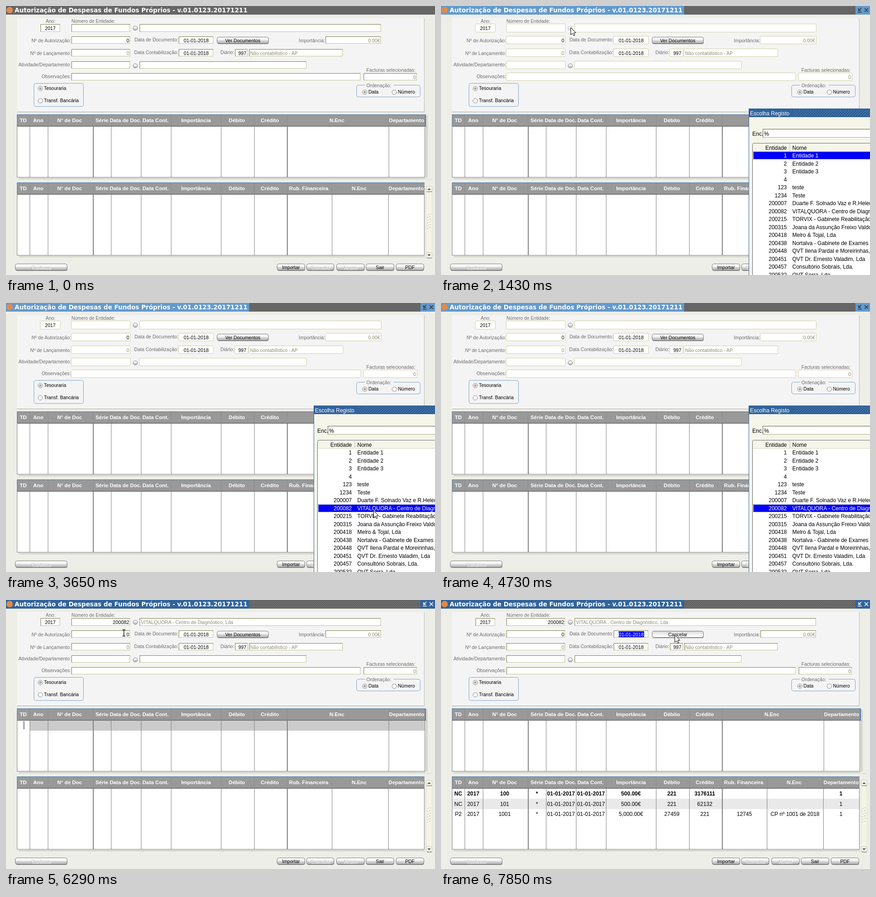
Write an HTML page that moves like this. It is 944 px wide and 593 px high and loops after 8000 ms.

```html
<!DOCTYPE html>
<html lang="pt">
<head>
<meta charset="utf-8">
<style>
html, body { margin: 0; width: 100%; height: 100%; overflow: hidden; background: #eeeee8; }
svg { display: block; width: 944px; height: 593px; font: 10.5px "Liberation Sans", Arial, sans-serif; }
rect, line { shape-rendering: crispEdges; }
.round { shape-rendering: auto; }
text { white-space: pre; }
</style>
</head>
<body>
<svg id="stage" viewBox="0 0 944 593"></svg>
<script>
const LOOP = 8000;
const LABEL = '#6c6c6c', OLIVE = '#8c8c70', GRAY = '#808080', BLUE = '#31639c';

const rect = (x, y, w, h, fill, extra = '') =>
  `<rect x="${x}" y="${y}" width="${w}" height="${h}" fill="${fill}" ${extra}/>`;
const box = (x, y, w, h, fill, stroke, r = 0) =>
  rect(x + .5, y + .5, w - 1, h - 1, fill, `stroke="${stroke}" rx="${r}"${r ? ' class="round"' : ''}`);
const line = (x1, y1, x2, y2, color, width = 1) =>
  `<line x1="${x1}" y1="${y1}" x2="${x2}" y2="${y2}" stroke="${color}" stroke-width="${width}"/>`;
const vline = (x, y1, y2, color, w = 1) => rect(x, y1, w, y2 - y1, color);
const text = (x, y, s, fill = LABEL, anchor = 'start', extra = '') =>
  `<text x="${x}" y="${y}" fill="${fill}" text-anchor="${anchor}" ${extra}>${s.replace(/&/g, '&amp;')}</text>`;
const group = (id, body, extra = '') => `<g id="${id}" ${extra}>${body}</g>`;

const defs = `<defs>
  <linearGradient id="metal" x2="0" y2="1"><stop stop-color="#fff"/><stop offset=".45" stop-color="#f4f4f4"/>
    <stop offset=".55" stop-color="#d6d6d6"/><stop offset="1" stop-color="#b4b4b4"/></linearGradient>
  <linearGradient id="glow" x2="0" y2="1"><stop stop-color="#d2d2d2"/><stop offset=".5" stop-color="#f2f2f2"/>
    <stop offset="1" stop-color="#fff"/></linearGradient>
  <pattern id="grip" width="4" height="4" patternUnits="userSpaceOnUse">
    ${rect(0, 0, 1, 1, '#a8a8a8') + rect(2, 2, 1, 1, '#a8a8a8') + rect(1, 1, 1, 1, '#303030') + rect(3, 3, 1, 1, '#303030')}</pattern>
  <pattern id="blueGrip" width="6" height="6" patternUnits="userSpaceOnUse">
    ${rect(0, 0, 1, 1, '#a5c6e7') + rect(3, 3, 1, 1, '#a5c6e7') + rect(1, 1, 1, 1, '#102c4c') + rect(4, 4, 1, 1, '#102c4c')}</pattern>
</defs>`;

// x, y, width, height
const fields = [
  [76, 40, 43, 17], [144, 40, 129, 17], [294, 40, 531, 17],
  [144, 67, 129, 16], [380, 67, 76, 16], [703, 67, 122, 16],
  [144, 95, 129, 16], [380, 95, 76, 16], [504, 95, 28, 16], [535, 95, 206, 16],
  [144, 122, 129, 16], [294, 122, 367, 16],
  [144, 148, 636, 16], [787, 148, 117, 16]
];

const sunkenField = ([x, y, w, h]) => box(x, y, w, h, '#fff', '#c2c294') +
  rect(x, y, w, 1, '#7b7b4a') + rect(x, y, 1, h, '#7b7b4a');
const flatField = ([x, y, w, h]) => box(x - 1, y - 1, w + 2, h + 2, '#fff', '#d0d0a4', 1);

const fieldValues =
  text(97.5, 53, '2017', '#000', 'middle') + text(271, 80, '0', '#000', 'end') +
  text(823, 80, '0.00€', OLIVE, 'end') + text(271, 108, '0', OLIVE, 'end') +
  text(418.5, 108, '01-01-2018', '#000', 'middle', 'font-size="10.8"') +
  text(520, 108, '997', '#000', 'middle') + text(537, 108, 'Não contabilistico - AP', OLIVE) +
  text(902, 161, '0', OLIVE, 'end');

const labels = text(98, 37, 'Ano:', LABEL, 'middle') + text(144, 37, 'Número de Entidade:', LABEL, 'start', 'font-size="10.2"') +
  [['Nº de Autorização:', 143, 80], ['Nº de Lançamento:', 143, 108], ['Atividade/Departamento:', 143, 133],
   ['Observações:', 143, 159], ['Data de Documento:', 379, 78], ['Data Contabilização:', 379, 106],
   ['Importância:', 702, 80], ['Diário:', 502, 106], ['Facturas selecionadas:', 901, 145]]
    .map(([s, x, y]) => text(x, y, s, LABEL, 'end')).join('');

const knob = (y, id = '') => `<circle ${id} cx="284.5" cy="${y}" r="4.7" fill="url(#metal)" stroke="#7c7c7c"/>`;

const radio = (x, y, label, on) =>
  `<circle cx="${x}" cy="${y}" r="5" fill="#f8f8f8" stroke="#888"/>` +
  (on ? `<circle cx="${x}" cy="${y}" r="2.7" fill="#a8a8a8"/>` : '') + text(x + 8, y + 3, label, '#000');

const radios = box(61, 170, 110, 52, 'none', '#7ba2ce', 4) + radio(75.5, 182, 'Tesouraria', true) +
  radio(75.5, 209, 'Transf. Bancária') + box(771, 174, 141, 27, 'none', '#7ba2ce', 4) +
  rect(790, 172, 63, 5, '#f4f4f4') + text(793, 179, 'Ordenação:') +
  radio(789.5, 190, 'Data', true) + radio(854.5, 190, 'Número');

const buttonShape = (x, y, w, fill = 'url(#metal)') =>
  rect(x + 1, y + 2, w - 1, 14, '#8a8a8a', 'rx="4" class="round"') + box(x, y, w, 15, fill, '#787878', 4);
const button = (x, w, s, on = true) => buttonShape(x, 568, w) +
  (on ? '' : text(x + w / 2 + 1, 582, s, '#fff', 'middle')) +
  text(x + w / 2 - (on ? 0 : .5), on ? 580 : 581, s, on ? '#000' : '#c0c0c0', 'middle');

const buttons = button(20, 115, 'Confirme', false) + button(596, 62, 'Importar') +
  button(661, 61, 'Consulta', false) + button(727, 62, 'Abater', false) +
  button(792, 62, 'Sair') + button(858, 62, 'PDF');

const heads = ['TD', 'Ano', 'N° de Doc', 'Série', 'Data de Doc.', 'Data Cont.', 'Importância', 'Débito', 'Crédito'];
const centers = [38, 71, 140, 211, 263, 329, 418, 508, 580.5];
const columns = [52, 92, 191, 231, 297, 363, 473, 546, 618];

function table(top, bottom, right, extraHeads, extraColumns) {
  const lines = [...columns, ...extraColumns];
  const head = (s, x) => text(x, top + 17, s, '#fff', 'middle', 'font-weight="bold" font-size="11.5"');
  return rect(28, bottom + 1, right - 27, 3, '#d4d4cc') +
    box(24, top + 26, right - 24, bottom - top - 26, '#fff', GRAY) +
    rect(24, top, right - 24, 27, '#999') + rect(24, top, right - 24, 1, '#4a79ad') + rect(24, top, 1, 26, '#4a79ad') +
    rect(24, top + 25, right - 24, 2, '#787878') +
    lines.map(x => vline(x, top + 1, top + 25, '#8e8e8e') +
      vline(x, top + 27, bottom, GRAY, x === 191 || x === 618 ? 2 : 1)).join('') +
    heads.map((s, i) => head(s, centers[i])).join('') + extraHeads.map(([s, x]) => head(s, x)).join('');
}

const arrowButton = (y, d) => box(924, y, 14, 13, '#f6f6ee', '#c8c8b0', 3) +
  `<path d="M927 ${y + 6.5 + 2 * d}h8l-4 ${-4 * d}z" fill="#555"/>` + rect(926, y + 12, 11, 1, '#555');
const scrollbars = rect(923, 241, 5, 137, '#d6d6ce') + rect(922, 239, 2, 27, '#4a79ad') + rect(924, 266, 4, 1, '#b8b8b0') +
  '<path d="M926 381q5 4 11 0" fill="none" stroke="#d0d0b8"/>' +
  box(924, 397, 14, 160, '#f4f4e6', '#e0e0c8', 5) + arrowButton(397, 1) + arrowButton(543, -1) +
  Array.from({ length: 12 }, (_, i) => rect(928 + i % 2 * 5 - (i >> 1) % 2, 459 + (i >> 1) * 6 - i % 2 * 2, 1, 2, '#a8a898')).join('');

const emptyRow = rect(53, 266, 868, 22, '#cbcbcb') +
  [...columns, 842].map(x => vline(x, 266, 288, GRAY, x === 191 || x === 618 ? 2 : 1)).join('');

const rowCenters = [...centers, 667.5, 779, 880];
const results = rect(25, 438, 895, 23, '#e9e9e9') +
  [...columns, 717, 841].map(x => vline(x, 438, 461, GRAY, x === 191 || x === 618 ? 2 : 1)).join('') +
  ['NC 100 500.00€ 221 3176111', 'NC 101 500.00€ 221 62132', 'P2 1001 5,000.00€ 27459 221'].map((row, r) => {
    const [kind, doc, amount, debit, credit] = row.split(' ');
    const day = '01-01-2017';
    const cells = [kind, '2017', doc, '*', day, day, amount, debit, credit,
      r === 2 ? '12745' : '', r === 2 ? 'CP nº 1001 de 2018' : '', '1'];
    return cells.map((s, i) => text(i === 4 ? 264 : i === 5 ? 330 : rowCenters[i], 431 + Math.round(r * 22.5), s, '#000', 'middle',
      `font-size="12" ${r ? '' : 'font-weight="bold"'}`)).join('');
  }).join('');

const title = rect(0, 0, 944, 19, '#666', 'id="barRest"') + rect(0, 0, 535, 19, '#666', 'id="barText"') +
  rect(912, 0, 32, 19, '#666', 'id="barIcons"') + group('barGrip', rect(537, 4, 375, 11, 'url(#grip)')) +
  '<circle cx="8" cy="9" r="7" fill="#e08a4a"/>' +
  text(19, 14, 'Autorização de Despesas de Fundos Próprios - v.01.0123.20171211', '#fff', 'start',
    'font-weight="bold" style="font-size:13.5px;font-family:\'DejaVu Sans\',Verdana,sans-serif"') +
  group('icons', '<path d="M925 4l-6 6m0-5v5h5M917 13.500h9M932 5l8 8m0-8l-8 8" fill="none" stroke-width="1.600"/>');

const entities = [
  ['1', 'Entidade 1'], ['2', 'Entidade 2'], ['3', 'Entidade 3'], ['4', ''], ['123', 'teste'], ['1234', 'Teste'],
  ['200007', 'Duarte F. Solnado Vaz e R.Helena'], ['200082', 'VITALQUORA - Centro de Diagnóstico, Lda'],
  ['200215', 'TORVIX - Gabinete Reabilitação Sul'], ['200315', 'Joana da Assunção Freixo Valdo'],
  ['200418', 'Melro & Tojal, Lda'], ['200438', 'Nortalva - Gabinete de Exames Gerais'],
  ['200448', 'QVT Ilena Pardal e Moreirinhas, Lda'], ['200451', 'QVT Dr. Ernesto Valadim, Lda'],
  ['200457', 'Consultório Sobrais, Lda.'], ['200532', 'QVT Serra, Lda']
];
const entityRow = ([code, name], i, color) => {
  const y = 334 + i * 17.5;
  return text(761, y, code, color, 'end') + text(773, y, name, color);
};
const picked = (id, i) => {
  const y = Math.round(321 + i * 17.5);
  return group(id, rect(687, y, 257, 17, '#0000ff') +
    rect(687.5, y + .5, 270, 16, 'none', 'stroke="#d8d860" stroke-dasharray="1 1"') + entityRow(entities[i], i, '#fff'));
};
const popup = rect(677, 226, 267, 367, '#f5f5ea') + rect(677, 226, 1, 367, BLUE) + rect(677, 226, 267, 19, BLUE) +
  rect(777, 231, 167, 11, 'url(#blueGrip)') + text(680, 241, 'Escolha Registo', '#fff') +
  text(685, 286, 'Enc.', '#000') + box(708, 271, 260, 19, '#fff', '#a8a878') +
  rect(708, 271, 236, 1, '#5c5c40') + rect(708, 271, 1, 19, '#5c5c40') + text(711, 286, '%', '#000') +
  box(685, 302, 280, 310, '#fff', '#606060', 3) + rect(687, 304, 257, 16, '#f5f5ea') + rect(687, 320, 257, 1, '#d4d4c0') +
  vline(767, 304, 320, '#c0c0b0') + text(761, 317, 'Entidade', '#000', 'end') + text(773, 317, 'Nome', '#000') +
  entities.map((e, i) => entityRow(e, i, '#000')).join('') + picked('pickFirst', 0) + picked('pickEighth', 7);

const stage = document.getElementById('stage');
stage.innerHTML = defs + rect(0, 0, 944, 593, '#eeeee8') +
  rect(24, 27, 897, 207, '#f4f4f4') + rect(920, 27, 1, 207, '#b4b4b4') + rect(24, 233, 897, 1, '#a8a8a8') + title + labels +
  group('sunken', fields.map(sunkenField).join('')) + group('flat', fields.map(flatField).join('')) +
  fieldValues + group('dateMark', rect(391, 69, 56, 13, '#0000ff')) +
  text(418.5, 80, '01-01-2018', '#000', 'middle', 'id="date" font-size="10.8"') +
  group('entity', text(271, 53, '200082', '#000', 'end', 'font-size="10.8"') + text(297, 53, entities[7][1], OLIVE)) +
  knob(49, 'id="lookup"') + knob(132) + radios +
  group('raised', buttonShape(464, 68, 114)) + group('hovered', buttonShape(464, 68, 114, 'url(#glow)')) +
  text(521, 80, 'Ver Documentos', '#000', 'middle', 'id="action"') +
  table(239, 378, 922, [['N.Enc', 728], ['Departamento', 881.5]], [842]) + group('emptyRow', emptyRow) +
  rect(39, 267, 1, 18, '#000', 'id="caret"') +
  table(389, 550, 921, [['Rub. Financeira', 666], ['N.Enc', 777], ['Departamento', 880.5]], [717, 841]) +
  group('results', results) + scrollbars + buttons + group('popup', popup, 'font-size="12"') +
  group('pointer', group('arrow', '<path d="M0 0v16l4-3.500 2.500 5.500 2.500-1-2.500-5.500h5z" fill="#fff" stroke="#000"/>') +
    group('beam', '<path d="M-3-7h2.500l.5.500.5-.5h2.500M0-6.500v13M-3 7h2.500l.5-.5.5.5h2.500" fill="none" stroke="#000" stroke-width="1.300"/>'));

const el = Object.fromEntries([...stage.querySelectorAll('[id]')].map(e => [e.id, e]));
const show = (id, on) => { el[id].style.display = on ? '' : 'none'; };

// start, end, then waypoints evenly spaced in time
const moves = [
  [70, 730, [813, 551], [650, 340], [470, 175], [345, 85], [294, 53], [285, 47]],
  [1750, 2550, [300, 62], [470, 180], [640, 300], [760, 378], [804, 415], [806, 441]],
  [2630, 2790, [806, 444], [806, 450]],
  [3650, 3810, [808, 457], [819, 485]],
  [3960, 4120, [830, 515], [857, 562], [900, 620]],
  [5190, 5970, [909, 398], [549, 314], [430, 195], [340, 110], [280, 74], [262, 67]],
  [6060, 6610, [262, 68], [259, 73], [261, 75]],
  [6920, 7380, [275, 70], [385, 62], [480, 70], [514, 77]]
];

function pointerAt(t) {
  const move = moves.filter(m => t >= m[0]).pop();
  if (!move) return [960, 620];
  const [start, end, ...points] = move;
  const steps = Math.round((end - start) / 78);
  const step = Math.min(steps, Math.floor((t - start) / (end - start) * steps + .2));
  const place = step / steps * (points.length - 1);
  const i = Math.min(Math.floor(place), points.length - 2);
  return [0, 1].map(k => Math.round(points[i][k] + (points[i + 1][k] - points[i][k]) * (place - i)));
}

const overText = (x, y) => (x > 24 && x < 921 && y > 265 && y < 549) ||
  fields.some(([fx, fy, w, h]) => x > fx && x < fx + w && y > fy && y < fy + h);

function draw(t) {
  const modal = t >= 1360 && t < 4810, picker = t >= 1430 && t < 4810, chosen = t >= 4810;
  const loaded = t >= 7770, done = t >= 7850;
  el.barText.setAttribute('fill', chosen ? BLUE : modal ? '#639ace' : '#666');
  el.barIcons.setAttribute('fill', chosen ? BLUE : modal ? '#639ace' : '#666');
  el.icons.setAttribute('stroke', chosen ? '#fff' : '#333');
  show('icons', modal || chosen);
  show('barGrip', chosen);
  show('sunken', !modal);
  show('flat', modal);
  show('popup', picker);
  show('pickFirst', t < 2940);
  show('pickEighth', t >= 2940);
  show('entity', chosen);
  el.lookup.setAttribute('opacity', t >= 960 && t < 1750 ? .45 : 1);
  show('emptyRow', chosen && t < 7700);
  show('caret', chosen && t < 7380 && Math.floor((t - 4880) / 500) % 2 === 0 || t >= 4810 && t < 4880);
  show('results', loaded);
  show('dateMark', done);
  el.date.setAttribute('fill', done ? '#fff' : '#000');
  el.action.textContent = done ? 'Cancelar' : 'Ver Documentos';
  show('hovered', t >= 7300);
  show('raised', t < 7300);

  const [x, y] = pointerAt(t);
  const beam = !picker && overText(x, y);
  el.pointer.setAttribute('transform', `translate(${x + .5} ${y + .5})`);
  show('beam', beam);
  show('arrow', !beam);
}

const origin = performance.now();
function tick() {
  draw((performance.now() - origin) % LOOP);
  requestAnimationFrame(tick);
}
tick();
</script>
</body>
</html>
```
